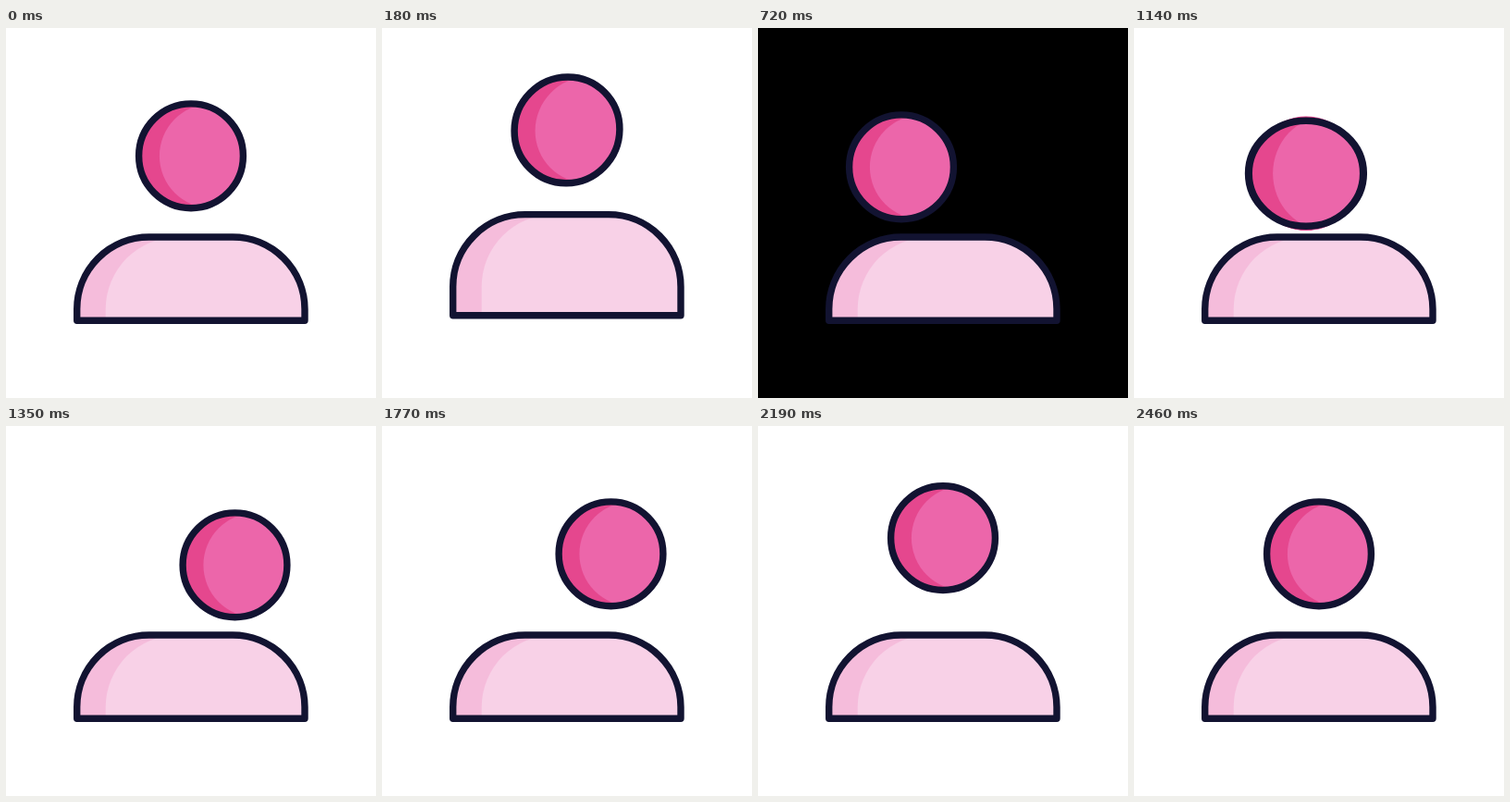
Write an HTML page that moves like this. It is 400x400 px and loops after 2.52 s.

```html
<!DOCTYPE html>
<html lang="en">
<head>
<meta charset="utf-8">
<title>Bouncing avatar</title>
<style>
  html, body { margin: 0; width: 100%; height: 100%; overflow: hidden; background: #fff; }
  svg { display: block; width: 100%; height: 100%; }
  .line { fill: none; stroke: #121331; stroke-width: 7.4; stroke-linejoin: round; }
</style>
</head>
<body>
<svg viewBox="0 0 400 400">
  <defs>
    <path id="torso"/>
    <circle id="ball" r="56.4"/>
    <clipPath id="torsoClip"><use href="#torso"/></clipPath>
    <clipPath id="ballClip"><use href="#ball"/></clipPath>
  </defs>
  <rect id="back" width="400" height="400"/>
  <g clip-path="url(#torsoClip)">
    <use href="#torso" fill="#f5bcdb"/>
    <use href="#torso" x="31" fill="#f8d1e7"/>
  </g>
  <use href="#torso" class="line"/>
  <g id="skin" clip-path="url(#ballClip)">
    <use href="#ball" fill="#e5478e"/>
    <use href="#ball" x="22.3" fill="#ec66aa"/>
  </g>
  <use id="ring" href="#ball" class="line"/>
</svg>
<script>
const LOOP = 2520, STEP = 30;
const $ = id => document.getElementById(id);

function draw(now) {
  const t = Math.floor(now % LOOP / STEP) * STEP;
  const part = (a, b) => Math.min(1, Math.max(0, (t - a) / (b - a)));
  const ease = (a, b) => { const u = part(a, b); return u * u * (3 - 2 * u); };
  const bump = (a, b) => Math.sin(Math.PI * part(a, b));

  // Head path: hop to the left shoulder, roll to the right one, hop back
  const roll = ease(930, 1350) ** 1.58;
  const x = 200 - 45 * ease(380, 660) + 92.5 * roll - 47.5 * ease(1770, 1985);
  const y = 138.3 + 12 * (ease(390, 690) - ease(1560, 1770))
    - 38 * bump(30, 600) + 8 * Math.sin(Math.PI * roll) - 45 * bump(1770, 2250);

  // Head shape: tall in the first hop, wide in the roll, flat in the last hop
  const tall = bump(150, 600), wide = bump(930, 1350), flat = bump(1800, 2160);
  const sx = 1 + .043 * tall + .008 * flat;
  const sy = 1 + .082 * tall - .088 * flat;
  const skew = -.044 * tall - .022 * flat;
  const place = (id, w, h) =>
    $(id).setAttribute('transform', `matrix(${w} ${skew} ${skew} ${h} ${x} ${y})`);
  place('ring', sx + .1 * wide, sy + .01 * wide);
  place('skin', sx + .05 * wide, sy + .1 * wide);

  // The torso stretches to throw the head up
  const lift = bump(60, 396) + bump(1830, 2130);
  const top = 226 - 27 * lift, bottom = 316.2 - 6 * lift;
  $('torso').setAttribute('d',
    `M76.7 ${bottom}V${top + 78}a78 78 0 0 1 78-78H245a78 78 0 0 1 78 78V${bottom}Z`);
  $('back').setAttribute('fill', t >= 720 && t < 930 ? '#000' : '#fff');
}

const start = performance.now();
function tick() {
  draw(performance.now() - start);
  requestAnimationFrame(tick);
}
tick();
</script>
</body>
</html>
```
